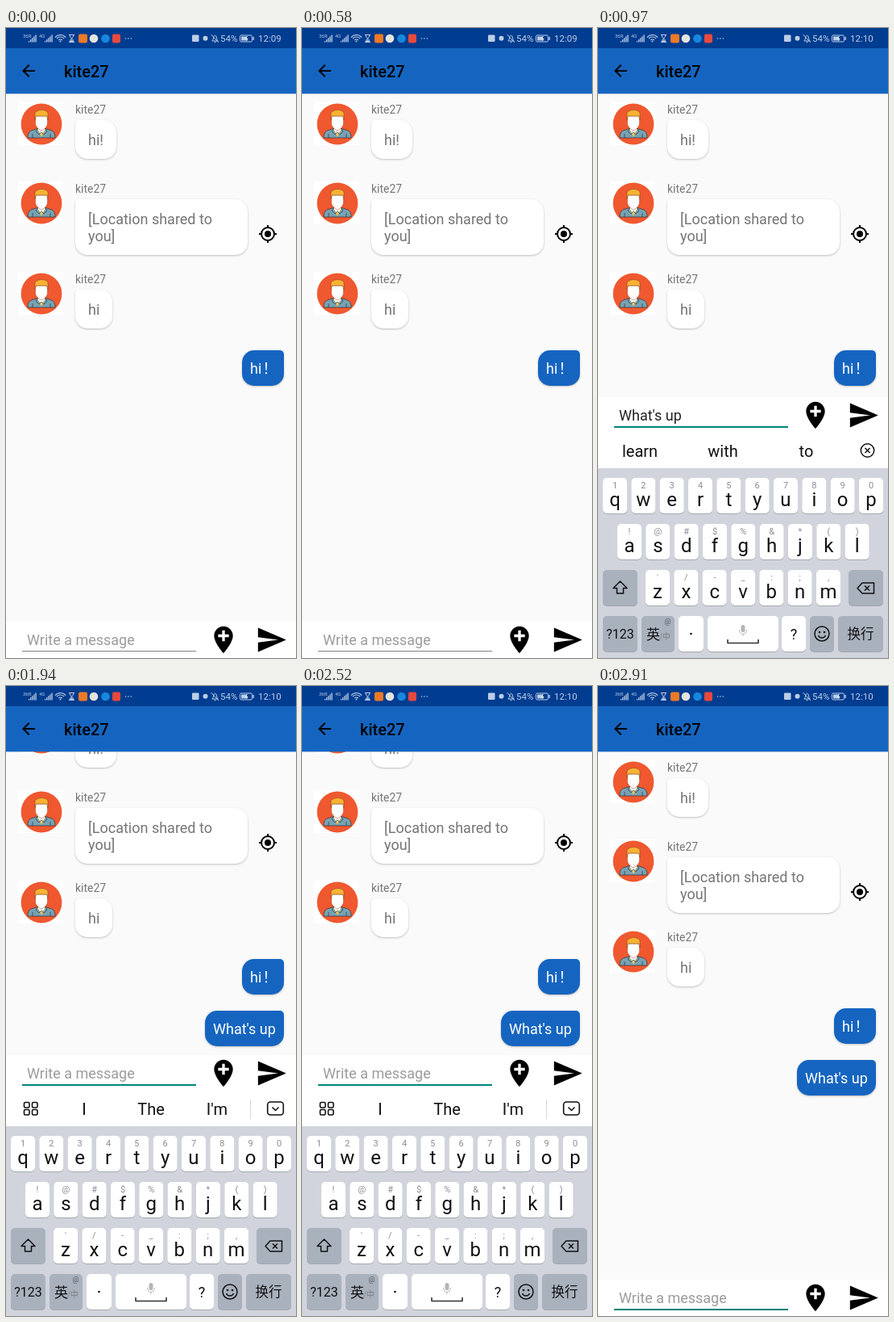
Animation, 360 px wide and 780 px high, one loop 3.88 s. Source, as an HTML page with a canvas:

```html
<!DOCTYPE html>
<html lang="en">
<head>
<meta charset="utf-8">
<title>Chat</title>
<style>
  html, body { margin: 0; width: 100%; height: 100%; overflow: hidden; background: #fafafa; }
  canvas { display: block; width: 360px; height: 780px; }
</style>
</head>
<body>
<canvas id="stage"></canvas>
<script>
const canvas = document.getElementById('stage');
const ratio = window.devicePixelRatio || 1;
canvas.width = 360 * ratio;
canvas.height = 780 * ratio;
const ctx = canvas.getContext('2d');
ctx.scale(ratio, ratio);

const CONTACT = 'kite27';
const HOLD = 970;
const BLUE = '#1565c0', GREY = '#757575', PALE = '#bccde6', TEAL = '#00857a', INK = '#111';
const SANS = 'Roboto, sans-serif';
const CJK = '"Noto Sans CJK SC", "Noto Sans CJK", sans-serif';

const SCENES = [
  { clock: '12:09', scroll: 0, sent: false, keyboard: false, focus: false, draft: '' },
  { clock: '12:10', scroll: 0, sent: false, keyboard: true, focus: true, draft: "What's up", hints: 'typing' },
  { clock: '12:10', scroll: 61, sent: true, keyboard: true, focus: true, draft: '', hints: 'idle' },
  { clock: '12:10', scroll: 0, sent: true, keyboard: false, focus: true, draft: '' }
];

const ICONS = {
  back: new Path2D('M20 11H7.83l5.59-5.59L12 4l-8 8 8 8 1.41-1.41L7.83 13H20z'),
  pin: new Path2D('M12 2C8.14 2 5 5.14 5 9c0 5.25 7 13 7 13s7-7.75 7-13c0-3.86-3.14-7-7-7zm4 8h-3v3h-2v-3H8V8h3V5h2v3h3z'),
  send: new Path2D('M2.01 21L23 12 2.01 3 2 10l15 2-15 2z')
};

function rect(x, y, w, h, color) {
  ctx.fillStyle = color;
  ctx.fillRect(x, y, w, h);
}

function round(x, y, w, h, r, color) {
  ctx.beginPath();
  ctx.roundRect(x, y, w, h, r);
  ctx.fillStyle = color;
  ctx.fill();
}

function frame(x, y, w, h, r, width, color) {
  ctx.beginPath();
  ctx.roundRect(x, y, w, h, r);
  ctx.lineWidth = width;
  ctx.strokeStyle = color;
  ctx.stroke();
}

function circle(x, y, r, color) {
  ctx.beginPath();
  ctx.arc(x, y, r, 0, Math.PI * 2);
  ctx.fillStyle = color;
  ctx.fill();
}

function ring(x, y, r, width, color, from = 0, to = Math.PI * 2) {
  ctx.beginPath();
  ctx.arc(x, y, r, from, to);
  ctx.lineWidth = width;
  ctx.strokeStyle = color;
  ctx.stroke();
}

function stroke(path, width, color) {
  ctx.lineWidth = width;
  ctx.strokeStyle = color;
  ctx.stroke(new Path2D(path));
}

function shape(path, color) {
  ctx.fillStyle = color;
  ctx.fill(new Path2D(path));
}

function text(str, x, y, size, color, align = 'left', family = SANS, weight = 400) {
  ctx.font = `${weight} ${size}px ${family}`;
  ctx.textAlign = align;
  ctx.fillStyle = color;
  ctx.fillText(str, x, y);
}

function at(x, y, draw, scale = 1) {
  ctx.save();
  ctx.translate(x, y);
  ctx.scale(scale, scale);
  draw();
  ctx.restore();
}

function icon(name, x, y, scale) {
  at(x, y, () => {
    ctx.fillStyle = '#000';
    ctx.fill(ICONS[name]);
  }, scale);
}

function signal(x, label) {
  text(label, x, 12, 6, PALE);
  for (let i = 0; i < 5; i++) rect(x + 7 + i * 2.1, 16 - i * 1.9, 1.3, 1.5 + i * 1.9, PALE);
}

function statusBar(clock) {
  rect(0, 0, 360, 25, '#003c8f');
  signal(21, '36R');
  signal(41, '4G');
  for (const r of [3, 6, 8.5]) ring(67.5, 17, r, 1.2, PALE, -Math.PI * 0.78, -Math.PI * 0.22);
  circle(67.5, 16.5, 1, PALE);
  stroke('M78 8.5h7M78 17.5h7M79 9c0 3 5 5 5 8M84 9c0 3-5 5-5 8', 1, PALE);
  shape('M79.5 17l2-3 2 3z', PALE);
  round(90, 7.5, 11, 11, 2, '#ef7a26');
  circle(109, 13, 5.3, '#e4e4df');
  circle(123.5, 13, 5.3, '#1687dc');
  round(132, 7.5, 10, 11, 2, '#e8493f');
  for (let i = 0; i < 3; i++) circle(148.5 + i * 3.4, 13, 0.8, PALE);

  round(231, 8.5, 8.5, 8.5, 1, PALE);
  circle(247.5, 12.8, 3, PALE);
  stroke('M255.5 16h8M256.5 15.5c1.3-1.5.6-6 3-6.3 2.5.3 1.8 4.8 3 6.3M258.5 17.7h2M254.5 8l9.5 10', 1, PALE);
  text('54%', 266, 17, 11.5, PALE);
  frame(290.5, 9, 15, 8, 1.5, 1, PALE);
  rect(292, 10.5, 7, 5, PALE);
  rect(306.5, 11, 1.4, 4, PALE);
  stroke('M299.5 10l-2.5 3.2h3l-1.5 3', 1, '#e6eef9');
  text(clock, 313, 17, 11.5, PALE);
}

function header() {
  rect(0, 25, 360, 56.4, BLUE);
  icon('back', 16, 41, 1);
  text(CONTACT, 72, 61, 20, '#000', 'left', SANS, 500);
}

function avatar(x, y) {
  at(x, y, () => {
    rect(-29, -27, 56, 53, '#fff');
    circle(0, 0, 25.4, '#f0582f');
    ctx.lineJoin = 'round';
    const body = 'M-17 17c0-6 2-8.500 6-9.500L-5 5.500H5l6 2c4 1 6 3.500 6 9.500z';
    shape(body, '#76a3b5');
    stroke(body, 0.8, '#3c3c40');
    shape('M-5 6H5L0 16z', '#f3c34a');
    shape('M-4 4H4V8L0 12-4 8z', '#fff');
    stroke('M-5 6L-7 9-3 13 0 10 3 13 7 9 5 6M-11 12V17M11 12V17', 0.8, '#3c3c40');
    const head = 'M-7.500-10H7.500V-2C8 3 3 7 0 8-3 7-8 3-7.500-2z';
    shape(head, '#fff');
    stroke(head, 0.6, '#b3512f');
    const hair = 'M-8-5V-14C-6-16-3-17.500 0-17.500 4-17.500 7-16 8-14V-5L6.500-10H-6.500z';
    shape(hair, '#f9b233');
    stroke(hair, 0.6, '#8a4f22');
  });
}

function bubble(x, y, w, h, color, corners) {
  ctx.save();
  ctx.shadowColor = 'rgba(0,0,0,.24)';
  ctx.shadowBlur = 2.5 * ratio;
  ctx.shadowOffsetY = ratio;
  round(x, y, w, h, corners, color);
  ctx.restore();
}

function received(y, w, lines) {
  avatar(44, y + 5);
  text(CONTACT, 86, y - 8, 14, GREY);
  bubble(86, y, w, 27 + lines.length * 21, '#fff', [5, 15, 15, 15]);
  lines.forEach((line, i) => text(line, 102, y + 31 + i * 21, 18, GREY));
}

function sentBubble(x, y) {
  bubble(x, y, 345 - x, 44, BLUE, [15, 5, 15, 15]);
}

function locate(x, y) {
  ring(x, y, 8, 2, '#000');
  circle(x, y, 4, '#000');
  rect(x - 1, y - 11, 2, 4, '#000');
  rect(x - 1, y + 7, 2, 4, '#000');
  rect(x - 11, y - 1, 4, 2, '#000');
  rect(x + 7, y - 1, 4, 2, '#000');
}

function messages(scene) {
  at(0, -scene.scroll, () => {
    received(114, 51, ['hi!']);
    received(212, 214, ['[Location shared to', 'you]']);
    locate(325, 255);
    received(324, 46, ['hi']);
    sentBubble(293, 399);
    text('hi', 303, 428, 18, '#fff');
    text('！', 318.5, 428, 18, '#fff', 'left', CJK);
    if (scene.sent) {
      sentBubble(247, 463);
      text("What's up", 257, 492, 18, '#fff');
    }
  });
}

function composer(scene) {
  at(0, scene.keyboard ? -278 : 0, () => {
    rect(0, 735, 360, 45, '#fff');
    text(scene.draft || 'Write a message', 26, 764, 18, scene.draft ? '#212121' : '#9c9c9c');
    if (scene.focus) rect(20, 771, 216, 2, TEAL);
    else rect(20, 771, 216, 1, '#808080');
    icon('pin', 250, 737.5, 5 / 3);
    icon('send', 309.5, 737.5, 5 / 3);
  });
}

function hints(kind) {
  rect(0, 501, 360, 44, '#fff');
  const word = (str, x) => text(str, x, 531, 20, INK, 'center');
  if (kind === 'typing') {
    word('learn', 52);
    word('with', 155);
    word('to', 258.5);
    ring(334.5, 523, 8.2, 1.5, INK);
    stroke('M331.500 520l6 6M337.500 520l-6 6', 1.5, INK);
    return;
  }
  for (const x of [22.5, 32.5]) {
    for (const y of [515.5, 524.5]) frame(x, y, 6.5, 6.5, 1.5, 1.6, INK);
  }
  word('I', 97);
  word('The', 180);
  word("I'm", 262);
  rect(303, 512, 1, 24, '#d4d4d4');
  frame(324.7, 515, 19.6, 16, 3.5, 1.6, INK);
  stroke('M330.500 521.500l4 4 4-4', 1.5, INK);
}

function key(x, y, w, dark) {
  round(x, y + 1, w, 44, 5, '#a4a8b0');
  round(x, y, w, 44, 5, dark ? '#a9b1bd' : '#fff');
}

function letterRow(letters, marks, firstX, y) {
  [...letters].forEach((letter, i) => {
    const x = firstX + i * 35.33;
    key(x - 15, y, 30);
    text(marks[i], x, y + 13, 11, '#8d8d92', 'center');
    text(letter, x, y + 35, 24, INK, 'center');
  });
}

function keyboard() {
  rect(0, 545, 360, 235, '#d1d4dc');
  letterRow('qwertyuiop', '1234567890', 21, 557);
  letterRow('asdfghjkl', '!@#$%&*()', 39, 614);
  letterRow('zxcvbnm', "'/-_:;,", 74, 671);

  key(6, 671, 43, true);
  key(311, 671, 43, true);
  ctx.lineJoin = 'round';
  stroke('M27.500 685l8.500 8.500h-4.500v6.500h-8v-6.500H19z', 1.5, INK);
  stroke('M322 693.500l6-6.500h14.500v13H328zM331 690.500l6 6M337 690.500l-6 6', 1.5, INK);

  const y = 728;
  key(6, y, 43, true);
  text('?123', 27.5, y + 28, 16, INK, 'center');
  key(54, y, 41, true);
  text('英', 60, y + 29, 17, INK, 'left', CJK);
  text('/中', 76, y + 29, 10, '#777d88', 'left', CJK);
  text('@', 86.5, y + 10, 9, '#555b66', 'center');
  key(100, y, 31);
  circle(115.5, 750, 1.3, INK);
  key(136, y, 88);
  round(177.5, 739, 5, 9, 2.5, '#b5b5b8');
  stroke('M175.500 745c0 7 9 7 9 0M180 750v3', 1, '#b5b5b8');
  stroke('M161 757v4.500h38V757', 1.6, '#333');
  key(228, y, 30);
  text('?', 243, y + 29, 18, INK, 'center');
  key(263, y, 30, true);
  ring(278, 750, 9, 1.5, INK);
  circle(275, 748, 1.3, INK);
  circle(281, 748, 1.3, INK);
  stroke('M273.500 752c1.500 4 7.500 4 9 0', 1.4, INK);
  key(298, y, 56, true);
  text('换行', 326, y + 28, 16.5, INK, 'center', CJK);
}

function draw() {
  const scene = SCENES[Math.floor(performance.now() / HOLD) % SCENES.length];
  rect(0, 0, 360, 780, '#fafafa');
  messages(scene);
  statusBar(scene.clock);
  header();
  composer(scene);
  if (scene.keyboard) {
    hints(scene.hints);
    keyboard();
  }
  requestAnimationFrame(draw);
}

draw();
</script>
</body>
</html>
```
